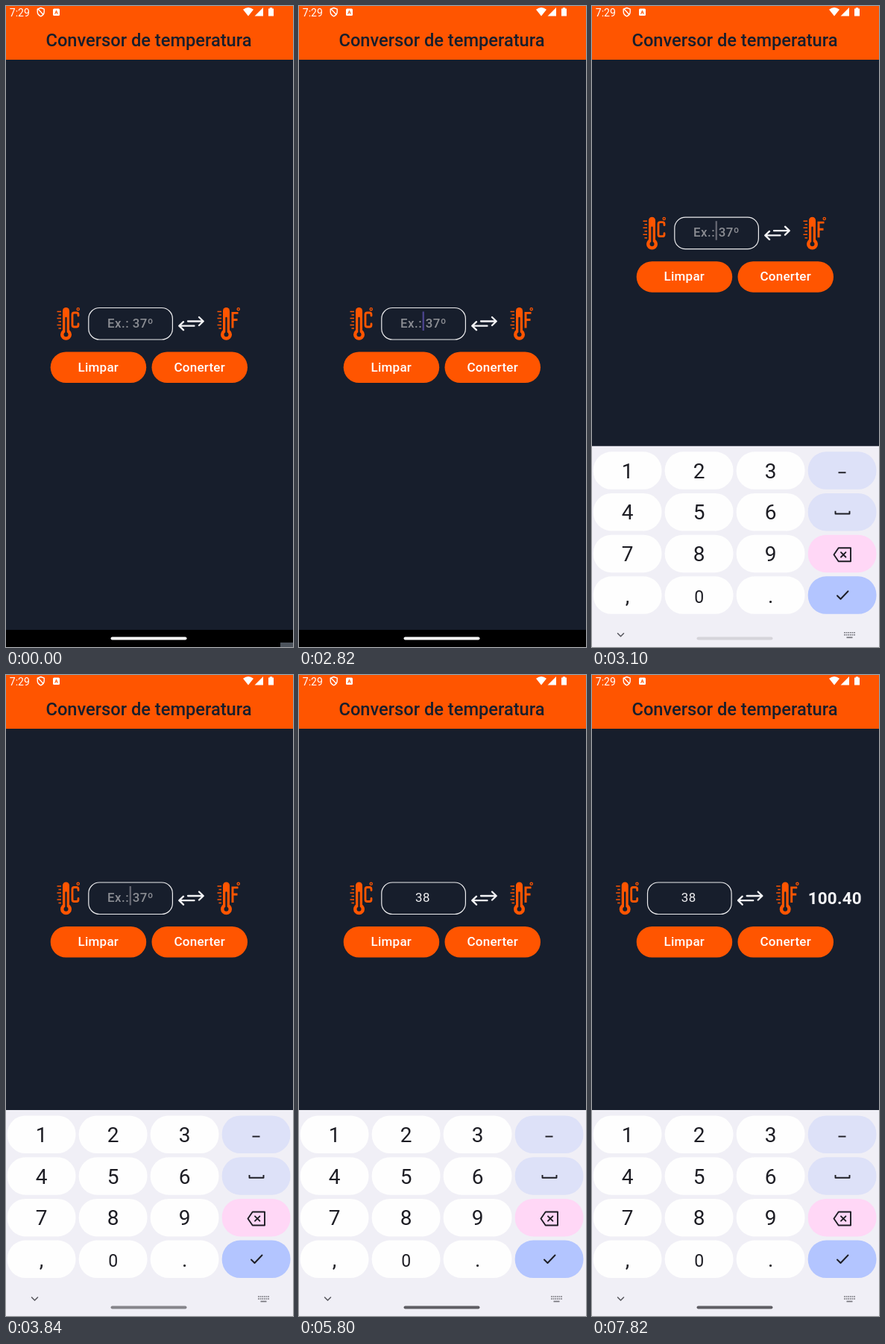
Recreate the animation shown at these times as an HTML page. Size 385 px wide and 859 px high, loop 8000 ms.

```html
<!DOCTYPE html>
<html lang="pt">
<head>
<meta charset="utf-8">
<title>Conversor de temperatura</title>
<style>
  html, body { margin: 0; width: 100%; height: 100%; overflow: hidden; background: #171e2c; }
  svg { display: block; width: 385px; height: 859px; }
  text { font-family: Roboto, sans-serif; }
  .mid text, text.mid { text-anchor: middle; }
  .btn { font-size: 17px; font-weight: 500; letter-spacing: .25px; fill: #fff; }
  .field { font-size: 16.85px; letter-spacing: .47px; }
  .line { fill: none; stroke-linecap: round; stroke-linejoin: round; }
  .digit { font-size: 28px; fill: #1d1d24; }
</style>
</head>
<body>
<svg viewBox="0 0 385 859">
  <defs>
    <g id="thermo">
      <path class="line" d="M80.5 408.500V440" stroke="#ff5500" stroke-width="9"/>
      <circle cx="80.500" cy="440.300" r="7.500" fill="#ff5500"/>
      <path class="line" d="M80.500 418V440" stroke="#171e2c" stroke-width="2.400"/>
      <circle cx="80.500" cy="440.300" r="3" fill="#171e2c"/>
      <path d="M68.500 409.500h5.500M70.500 414h3.500M68.500 418.500h5.500M70.500 423h3.500M68.500 427.500h5.500M70.500 432h3.500" stroke="#ff5500" stroke-width="1.600"/>
      <circle cx="96.700" cy="406.300" r="1.600" fill="none" stroke="#ff5500" stroke-width="1.300"/>
    </g>
    <radialGradient id="glow">
      <stop offset="0" stop-color="#d98a70" stop-opacity=".35"/>
      <stop offset="1" stop-color="#d98a70" stop-opacity="0"/>
    </radialGradient>
    <clipPath id="pill"><rect x="195.500" y="463.500" width="128.500" height="41.500" rx="20.750"/></clipPath>
  </defs>

  <rect width="385" height="859" fill="#171e2c"/>

  <g id="content">
    <g id="row">
      <use href="#thermo"/>
      <path class="line" d="M97 415v-1.500q0-2.500-2.500-2.500h-3q-2.500 0-2.500 2.500v14q0 2.500 2.500 2.500h3q2.500 0 2.500-2.500V426" stroke="#ff5500" stroke-width="2.800"/>
      <use href="#thermo" x="215"/>
      <path d="M311.500 411.400H304V431.500M304 420.500h6.500" fill="none" stroke="#ff5500" stroke-width="2.900"/>
      <rect x="110.800" y="404.500" width="112.600" height="42.500" rx="14.500" fill="none" stroke="#ececee" stroke-width="1.200"/>
      <text id="value" class="field mid" y="430.500"></text>
      <rect id="caret" y="409.500" width="2.300" height="25.500"/>
      <path class="line" d="M244 422.500H264.500M259 417l5.700 5.500-5.700 5.500M252.500 428.700H232.500M238 423.200l-5.700 5.500 5.700 5.500" stroke="#f4f4f6" stroke-width="2.300"/>
      <text id="result" x="325.200" y="433.500" font-size="22.460" font-weight="700" letter-spacing=".2" fill="#f4f4f6">100.40</text>
    </g>
    <g fill="#ff5500">
      <rect x="59.700" y="463.500" width="128.500" height="41.500" rx="20.750"/>
      <rect x="195.500" y="463.500" width="128.500" height="41.500" rx="20.750"/>
    </g>
    <g id="ripple" clip-path="url(#pill)">
      <rect x="195" y="463" width="130" height="43" fill="#6750a4" opacity=".11"/>
      <circle id="wave" cx="256" cy="484" r="30" fill="url(#glow)"/>
    </g>
    <g class="mid btn">
      <text x="123.800" y="489.700">Limpar</text>
      <text x="259.700" y="489.700">Conerter</text>
    </g>
  </g>

  <rect width="385" height="72" fill="#ff5500"/>
  <text class="mid" x="191.500" y="53.500" font-size="23.650" font-weight="500" fill="#171e2c">Conversor de temperatura</text>

  <g fill="#fff">
    <text x="4.800" y="13.500" font-size="14">7:29</text>
    <path class="line" d="M46.700 2.500l4.500 1.700v3.600q0 4-4.500 6-4.500-2-4.500-6V4.200zM43.500 4.500l6.500 7" stroke="#fff" stroke-width="1.400"/>
    <rect x="63" y="3.500" width="9" height="9.500" rx="1.500"/>
    <path class="line" d="M65.800 10.500l1.700-4.500 1.700 4.500M66.500 9h2" stroke="#ff5500" stroke-width="1"/>
    <path d="M318 4.800q7-5.600 14 0L325 13.500zM345 2v11.500H333.500z"/>
    <path d="M353.800 2.300h3.400v1.200h1.800v10h-7v-10h1.800z"/>
  </g>

  <rect y="836" width="385" height="23" fill="#000"/>
  <g id="keyboard">
    <rect y="583" width="385" height="277" fill="#f0eff6"/>
    <g id="keys" class="mid"></g>
    <g class="line" stroke="#1d1d24" stroke-width="1.900">
      <path d="M330.500 618.500h10" stroke-linecap="butt"/>
      <path d="M326.500 670v3.700h19V670" stroke-linecap="butt"/>
      <path d="M330.700 719.500H347V737.500H330.700L324.500 728.500zM334 725.300l6.400 6.400M340.400 725.300l-6.400 6.400"/>
      <path d="M329 783.500l4.500 4.500 10-10.500"/>
    </g>
    <path class="line" d="M34.500 834l4 4 4-4" stroke="#55555c" stroke-width="1.500"/>
    <g stroke="#77777e" stroke-width="1.700">
      <path d="M338 833h15M338 836h15" stroke-dasharray="1.800 .84"/>
      <path d="M341.500 839.500h8"/>
    </g>
  </g>
  <rect id="handle" x="140.500" y="845.500" width="102" height="4" rx="2"/>
  <rect id="corner" x="368" y="853" width="17" height="6" fill="#4c535c"/>
</svg>
<script>
const LOOP = 8000, KB_HEIGHT = 276, NAV_HEIGHT = 23;
const $ = id => document.getElementById(id);
const set = (id, attrs) => { for (const k in attrs) $(id).setAttribute(k, attrs[k]); };
const clamp = v => Math.min(1, Math.max(0, v));

// Value of the last [time, value] pair already reached.
const at = (t, list) => list.reduce((v, [start, next]) => t >= start ? next : v, list[0][1]);

function buildKeys() {
  const faces = ['1', '2', '3', '', '4', '5', '6', '', '7', '8', '9', '', ',', '0', '.', ''];
  const side = ['#dde1f8', '#dde1f8', '#ffd7f6', '#b3c5ff'];
  $('keys').innerHTML = faces.map((face, i) => {
    const col = i % 4, row = i >> 2;
    const x = 1.7 + col * 96, y = 590.5 + row * 55.7;
    const fill = col === 3 ? side[row] : '#fefefe';
    const size = face === '0' ? 23 : 28;
    return `<rect id="key${face || 'F' + row}" x="${x}" y="${y}" width="91.800" height="50.500" rx="24.500" fill="${fill}"/>` +
      `<text class="digit" x="${x + 45.9}" y="${y + 35.3}" style="font-size:${size}px">${face}</text>`;
  }).join('');
}

// cubic-bezier(.2, 0, 0, 1)
function ease(x) {
  if (x <= 0 || x >= 1) return clamp(x);
  let lo = 0, hi = 1;
  for (let i = 0; i < 24; i++) {
    const s = (lo + hi) / 2;
    if (.6 * (1 - s) ** 2 * s + s ** 3 < x) lo = s; else hi = s;
  }
  return 3 * (1 - lo) * lo * lo + lo ** 3;
}

const rise = t => KB_HEIGHT * ease((t - 2875) / 300);

const handleColor = [
  [0, '#fff'], [2925, '#fbfbfd'], [2995, '#ececf1'], [3065, '#d5d4da'],
  [3350, '#c2c1c7'], [3560, '#a3a2a8'], [3810, '#86858b'], [4120, '#6b6a70'], [4300, '#5f5e64']
];
const caretAlpha = [
  [0, 0], [2820, 1], [3350, 0], [3810, .5], [3840, 1], [4300, 0], [4470, 1], [4970, 0],
  [5300, 1], [5800, 0], [6280, 1], [6780, 0], [7320, 1], [7820, 0]
];

function draw(t) {
  const step = t < 2890 ? 0 : 2890 + Math.floor((t - 2890) / 35) * 35;
  const up = rise(step);
  // Content is laid out one display refresh after the keyboard moves.
  const lift = Math.max(0, rise(step - 16) - NAV_HEIGHT) / 2;
  set('keyboard', { transform: `translate(0 ${KB_HEIGHT - up})`, visibility: up ? 'visible' : 'hidden' });
  set('content', { transform: `translate(0 ${-lift})` });

  const done = t >= 6555;
  set('row', { transform: `translate(${done ? -36.3 : 0} 0)` });
  set('result', { visibility: done ? 'visible' : 'hidden' });

  const typed = at(t, [[0, ''], [4470, '3'], [5300, '38']]);
  $('value').textContent = typed || 'Ex.: 37º';
  set('value', { x: typed ? 166 : 167, fill: typed ? '#f0f0f2' : '#8b8d93', 'font-weight': typed ? 400 : 500 });
  set('caret', {
    x: at(t, [[0, 165.6], [4470, 170.4], [5300, 175.4]]),
    fill: t < 2890 ? '#4c448e' : '#656672',
    opacity: at(t, caretAlpha)
  });

  const pressed = (a, b) => t >= a && t < b ? '#dfdfe7' : '#fefefe';
  set('key3', { fill: pressed(4380, 4470) });
  set('key8', { fill: pressed(5210, 5300) });

  set('ripple', { opacity: Math.min(clamp((t - 6500) / 70), clamp((7150 - t) / 400)) });
  set('wave', { r: 15 + 80 * clamp((t - 6520) / 450) });

  set('handle', { fill: at(t, handleColor) });
  set('corner', { opacity: at(t, [[0, 1], [30, .5], [70, 0]]) });
}

function tick() {
  draw(performance.now() % LOOP);
  requestAnimationFrame(tick);
}

buildKeys();
set('result', { 'text-anchor': 'start', x: 326 });
tick();
</script>
</body>
</html>
```
